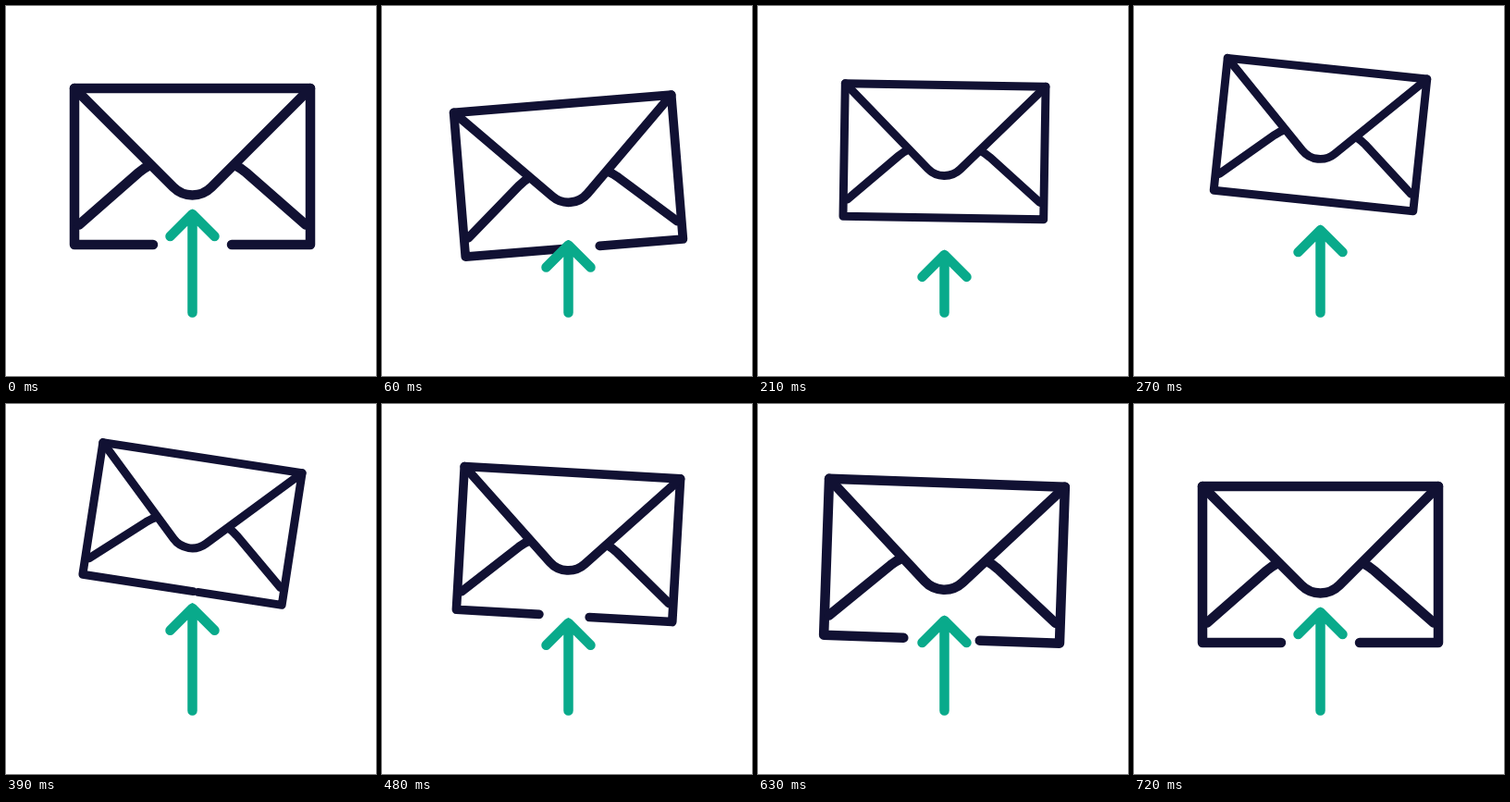
Animation of 400x400 px, one loop 2750 ms. Source, as an HTML page:

```html
<!DOCTYPE html>
<html lang="en">
<head>
<meta charset="utf-8">
<title>Sending mail</title>
<style>
  html, body { margin: 0; height: 100%; overflow: hidden; background: #fff; }
  svg { display: block; width: 100%; height: 100%; }
  path { fill: none; stroke-width: 10.5; stroke-linecap: round; stroke-linejoin: round; }
  #envelope { stroke: #111133; }
  #arrow { stroke: #09aa8b; }
</style>
</head>
<body>
<svg viewBox="0 0 400 400">
  <g id="envelope">
    <path id="wall"/>
    <path d="M-127.5-84.5L-20.6 22.4A29.1 29.1 0 0 0 20.6 22.4L127.5-84.5"/>
    <path d="M-122.5 63L-58 6.5Q-52 1.5-46-1.5M122.5 63L58 6.5Q52 1.5 46-1.5"/>
  </g>
  <path id="arrow"/>
</svg>
<script>
const LOOP = 2750, MOVE = 720, STEP = 30;
const CROUCHED = 120, PEAK = 360, LANDED = 540;

const [envelope, wall, arrow] = ["envelope", "wall", "arrow"].map(id => document.getElementById(id));

const easeIn = u => u * u;
const easeOut = u => Math.sin(u * Math.PI / 2);
const easeInOut = u => u * u * (3 - 2 * u);

function draw(now) {
  const t = Math.floor(Math.min(now % LOOP, MOVE) / STEP) * STEP;
  const part = (from, to) => Math.max(0, Math.min(1, (t - from) / (to - from)));

  // Envelope: crouch, jump, fall, then a damped swing back to rest
  const crouch = easeInOut(part(0, CROUCHED));
  const jump = easeOut(part(CROUCHED, PEAK));
  const fall = easeIn(part(PEAK, LANDED));
  const settle = part(LANDED, MOVE);
  const swing = (1 - settle) * Math.cos(2 * Math.PI * settle) - 1;

  const y = 173.5 + 20.3 * crouch - 65.8 * jump + 53 * fall + 7.5 * swing;
  const angle = -9.3 * crouch + 18.4 * jump - 13.1 * fall - 4 * swing;
  const scale = 1 - 0.15 * (crouch - fall);
  envelope.setAttribute("transform", `translate(201.5 ${y}) rotate(${angle}) scale(${scale})`);

  // Arrow and the opening beneath the envelope
  const grow = easeInOut(part(CROUCHED, PEAK));
  const drop = easeInOut(part(PEAK, LANDED));
  const rest = easeInOut(settle);
  const tip = 225 + 67 * crouch - 73 * grow + 24 * drop - 18 * rest;
  arrow.setAttribute("d", `M201.5 331.5V${tip}m-24 24l24-24l24 24`);

  const middle = 17 * (crouch - easeInOut(part(390, 480)));
  const half = 42.5 * (1 - crouch) + 40 * drop + 2.5 * rest;
  wall.setAttribute("d", `M${middle - half} 84.5H-127.5V-84.5H127.5V84.5H${middle + half}`);
}

const start = performance.now();
function tick() {
  draw(performance.now() - start);
  requestAnimationFrame(tick);
}
tick();
</script>
</body>
</html>
```
